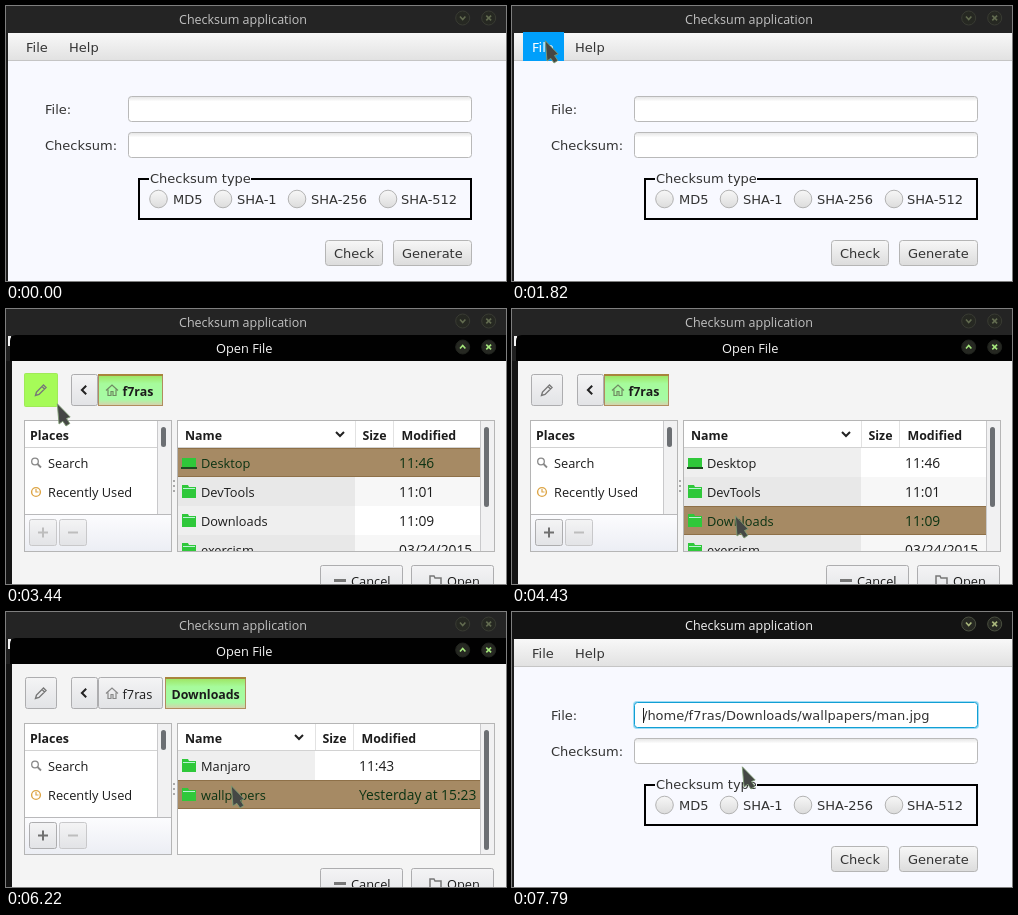
An HTML page that plays this animation: 500 by 275 pixels, repeating every 8 s.

```html
<!DOCTYPE html>
<html lang="en">
<head>
<meta charset="utf-8">
<title>Checksum application</title>
<style>
html, body { margin: 0; width: 100%; height: 100%; overflow: hidden; background: #222; }
svg { display: block; width: 500px; height: 275px; }
text { white-space: pre; }
.fx { font: 13px "DejaVu Sans", sans-serif; fill: #333; }
.ui { font: 12.8px "Open Sans", "Noto Sans", sans-serif; fill: #1c1c1c; }
.num { font-size: 13.8px; }
.bold { font-weight: 700; font-size: 12.4px; }
.title { font-size: 12.5px; }
</style>
</head>
<body>
<svg viewBox="0 0 500 275" xmlns="http://www.w3.org/2000/svg">
  <defs>
    <linearGradient id="bar" x2="0" y2="1"><stop stop-color="#f8f8f8"/><stop offset="1" stop-color="#e1e1e1"/></linearGradient>
    <linearGradient id="btn" x2="0" y2="1"><stop stop-color="#f7f7f7"/><stop offset="1" stop-color="#dcdcdc"/></linearGradient>
    <linearGradient id="gtk" x2="0" y2="1"><stop stop-color="#f4f4f5"/><stop offset="1" stop-color="#e2e3e6"/></linearGradient>
    <linearGradient id="tools" x2="0" y2="1"><stop stop-color="#fcfcfe"/><stop offset="1" stop-color="#eceef4"/></linearGradient>
    <linearGradient id="active" x2="0" y2="1"><stop stop-color="#9de35c"/><stop offset=".3" stop-color="#a6fb9c"/><stop offset=".8" stop-color="#a6fba4"/><stop offset="1" stop-color="#d9cfae"/></linearGradient>
    <linearGradient id="inset" x2="0" y2="1"><stop stop-color="#e4e4e4"/><stop offset=".2" stop-color="#fff"/></linearGradient>
    <filter id="shadow" x="-10%" y="-15%" width="120%" height="130%"><feDropShadow dx="0" dy="1" stdDeviation="2" flood-opacity=".4"/></filter>
    <clipPath id="rows"><rect x="172" y="139" width="302" height="103"/></clipPath>
  </defs>
  <g id="stage"></g>
</svg>
<script>
const LOOP = 8000;
const USER = "f7ras";
const SELECTED = "#a68a64";
const GREEN = "#2fc83a";
const stage = document.getElementById("stage");

const rect = (x, y, w, h, fill, extra = "") =>
  `<rect x="${x}" y="${y}" width="${w}" height="${h}" fill="${fill}" ${extra}/>`;
const box = (x, y, w, h, fill, stroke, r = 2) =>
  rect(x + .5, y + .5, w - 1, h - 1, fill, `stroke="${stroke}" rx="${r}"`);
const line = (d, stroke, width = 1) =>
  `<path d="${d}" fill="none" stroke="${stroke}" stroke-width="${width}"/>`;
const text = (cls, x, y, str, fill) =>
  `<text class="${cls}" x="${x}" y="${y}"${fill ? ` style="fill:${fill}"` : ""}>${str}</text>`;

// Each move: start, end, number of redraws, then the points passed on the way.
const moves = [
  [1000, 1200, 6, [22, 290], [24, 150], [35, -24]],
  [1350, 1590, 7, [35, -24], [32, 33]],
  [1740, 1820, 3, [32, 33], [34, 36]],
  [2520, 2680, 5, [34, 36], [44, 70]],
  [3320, 3440, 4, [44, 70], [52, 96]],
  [3480, 3960, 13, [52, 96], [120, 142], [186, 182], [213, 198], [223, 204]],
  [4240, 4280, 2, [223, 204], [224, 208]],
  [4710, 5500, 18, [224, 208], [226, 192], [230, 177], [232, 168]],
  [5540, 6220, 14, [232, 168], [232, 150], [229, 160], [226, 175]],
  [6710, 7030, 9, [227, 175], [229, 164], [231, 156]]
];

function pointer(t) {
  let at = null;
  for (const [start, end, steps, ...points] of moves) {
    if (t < start) break;
    const step = Math.min(steps, 1 + Math.floor((t - start) / (end - start) * (steps - 1) + 1e-6));
    const pos = step / steps * (points.length - 1);
    const i = Math.min(Math.floor(pos), points.length - 2);
    at = points[i].map((v, k) => Math.round(v + (points[i + 1][k] - v) * (pos - i)));
  }
  return at;
}

const drawPointer = ([x, y]) =>
  `<path transform="translate(${x} ${y})" d="M-.7-1.2L12.2 12L8.5 13.5L11.8 18.5L8 21L4.8 16.3L1 19Z" fill="#454745" stroke="#7f9c74" stroke-width=".9" stroke-linejoin="round"/>`;

function windowButtons(y, color, up, edge) {
  const chevron = up ? `M454 ${y + 1.5}l2.7-3l2.7 3` : `M454 ${y - 1.5}l2.7 3l2.7-3`;
  const disc = x => `<circle cx="${x}" cy="${y}" r="7" fill="#262822" stroke="${edge}"/>`;
  return disc(456.7) + disc(482.7) + line(chevron, color, 1.6) +
    line(`M480.3 ${y - 2.4}l4.8 4.8m0-4.8l-4.8 4.8`, color, 1.6);
}

function titleBar(focused) {
  return rect(0, 0, 500, 275, "#1f1f1f") + rect(0, 0, 500, 27, focused ? "#131313" : "#242424") +
    text("ui title", 173, 18, "Checksum application", focused ? "#f4f4f4" : "#c2c2c2") +
    windowButtons(12, focused ? "#a9b77c" : "#626b50", false, focused ? "#4a4f40" : "#393b33");
}

function field(y, focused) {
  return focused
    ? rect(121, y - 1, 346, 28, "#9edcf5", 'rx="4"') + box(122, y, 344, 26, "#fff", "#129fd4", 3)
    : box(122, y, 344, 26, "url(#inset)", "#b9b9b9", 3);
}

const fxButton = (x, w, label) =>
  box(x, 234, w, 26, "url(#btn)", "#b5b5b5", 3) + text("fx", x + 9, 252, label);

const radio = (cx, x, label) =>
  `<circle cx="${cx}" cy="193" r="8.8" fill="url(#btn)" stroke="#b3b3b3"/>` + text("fx", x, 198, label);

function menuPopup(hover) {
  return `<g filter="url(#shadow)">${box(13, 55, 132, 69, "#f6f6f6", "#c4c4c4", 0)}</g>` +
    (hover ? rect(14, 59, 130, 26, "#009ffb") : "") +
    text("fx", 23, 77, "Open", hover ? "#fff" : "") + text("fx", 90, 77, "Ctrl+O", hover ? "#fff" : "") +
    line("M20 89.5H138", "#cfcfcf") +
    text("fx", 23, 111, "Exit") + text("fx", 90, 111, "Ctrl+X");
}

function mainWindow({ focused, fileHot, popup, itemHot, path }) {
  return titleBar(focused) + rect(2, 27, 498, 248, "#f8f9ff") +
    rect(2, 27, 498, 28, "url(#bar)") + line("M2 54.5H500", "#c5c5c5") +
    (fileHot ? rect(11, 26, 41, 29, "#009ffb") : "") +
    text("fx", 20, 46, "File", fileHot ? "#fff" : "") + text("fx", 63, 46, "Help") +
    text("fx", 39, 108, "File:") + text("fx", 39, 144, "Checksum:") +
    field(90, path) + field(126) +
    (path ? text("fx", 131, 108, path) + line("M131.5 96V111", "#222") : "") +
    rect(133, 173, 332, 40, "none", 'stroke="#000" stroke-width="2"') +
    rect(143, 168, 102, 12, "#f8f9ff") + text("fx", 144, 177, "Checksum type") +
    radio(152.5, 167, "MD5") + radio(217, 231, "SHA-1") +
    radio(291, 305, "SHA-256") + radio(382, 395, "SHA-512") +
    fxButton(319, 58, "Check") + fxButton(387, 79, "Generate") +
    (popup ? menuPopup(itemHot) : "");
}

const HOME = [
  ["Desktop", "", "11:46", "desktop"],
  ["DevTools", "", "11:01", "folder"],
  ["Downloads", "", "11:09", "folder"],
  ["exercism", "", "03/24/2015", "folder"]
];
const DOWNLOADS = [["Manjaro", "", "11:43", "folder"], ["wallpapers", "", "Yesterday at 15:23", "folder"]];
const WALLPAPERS = [["man.jpg", "216.3 kB", "03/16/2015", "image"]];

const places = [
  { files: HOME, sizeX: 350, dateX: 388, arrowX: 334, thumb: 80 },
  { files: DOWNLOADS, sizeX: 310, dateX: 348, arrowX: 293, thumb: 120 },
  { files: WALLPAPERS, sizeX: 325, dateX: 390, arrowX: 308, thumb: 120 }
];

const icons = {
  desktop: y => rect(176, y - 5, 14, 9, GREEN) + rect(175, y + 4, 16, 2, "#1f4a22"),
  folder: y => `<path d="M176 ${y - 7}h6l1 2h7v11h-14z" fill="${GREEN}"/>` + line(`M177 ${y - 3.5}h12`, "#b9f3d5"),
  image: y => rect(175, y - 5, 16, 9, "#202020") + rect(180, y - 1, 6, 1, "#ccc")
};

function fileRow([name, size, date, icon], i, { sizeX, dateX }, selected) {
  const y = 139 + i * 29;
  const odd = i % 2;
  const ink = selected ? "#0b3313" : "";
  const fills = selected ? [SELECTED, SELECTED] : [odd ? "#e8e8e8" : "#efefef", odd ? "#f7f7f7" : "#fff"];
  return rect(172, y, 302, 29, fills[1]) + rect(172, y, sizeX - 173, 29, fills[0]) +
    (selected ? line(`M172 ${y + .5}H474m0 28H172`, "#8e7048") : "") +
    icons[icon](y + 15) + text("ui", 195, y + 20, name, ink) +
    text("ui num", sizeX + 4.5, y + 20, size, ink) + text("ui num", dateX + 5, y + 20, date, ink);
}

// Scrollbar gutter with its thumb
const scrollbar = (x, w, h, thumb) =>
  rect(x, 112, w, h, "#f1f1f2") + line(`M${x + .5} 112v${h}`, "#c9c9cb") +
  rect(x + 4, 118, 5, thumb, "#6c6f73", 'rx="2.5"');

function fileList(place, selected) {
  const { files, sizeX, dateX, arrowX, thumb } = place;
  return box(171, 111, 318, 132, "#fff", "#b5b5b5", 0) +
    `<g clip-path="url(#rows)">${files.map((f, i) => fileRow(f, i, place, i === selected)).join("")}</g>` +
    line("M172 138.5H474", "#d2d2d2") +
    line(`M${sizeX - .5} 112V138M${dateX - .5} 112V138`, "#e2e2e2") +
    text("ui bold", 179, 131, "Name") + text("ui bold", sizeX + 6.5, 131, "Size") +
    text("ui bold", dateX + 7.5, 131, "Modified") +
    line(`M${arrowX - 4} 123l4 4l4-4`, "#222", 2) +
    scrollbar(474, 14, 130, thumb);
}

function pathButton(x, w, label, active, home) {
  const tx = x + (home ? 24.5 : 6.5);
  return box(x, 65, w, 32, active ? "url(#active)" : "url(#gtk)", active ? "#b08c5e" : "#adadaf", active ? 0 : 2) +
    (active ? rect(x, 65, w, 2, "#a8843c") : "") +
    (home ? line(`M${x + 8} 81.5l6-5.5l6 5.5m-10-1v6h3v-4h2v4h3v-6`, active ? "#6f8a62" : "#888", 1.2) : "") +
    text(active ? "ui bold" : "ui", tx, 87, label);
}

function placesPanel(canAdd) {
  return box(18, 111, 148, 132, "#fff", "#b5b5b5", 0) +
    text("ui bold", 24, 131, "Places") + line("M19 138.5H152", "#d2d2d2") +
    `<circle cx="29" cy="152.5" r="3.3" fill="none" stroke="#888" stroke-width="1.3"/>` +
    line("M31.5 155l3.5 3.5", "#888", 1.8) + text("ui", 42, 159, "Search") +
    `<circle cx="30" cy="183" r="4.4" fill="none" stroke="#dda546" stroke-width="1.4"/>` +
    line("M30 180v3h2.5", "#dda546", 1.2) + text("ui", 42, 188, "Recently Used") +
    scrollbar(151, 14, 93, 20) +
    rect(19, 206, 146, 36, "url(#tools)") + line("M19 205.5H165", "#b9b9bb") +
    box(23, 210, 28, 27, "url(#gtk)", canAdd ? "#adadaf" : "#c8c8ca") +
    box(53, 210, 28, 27, "url(#gtk)", "#c8c8ca") +
    line("M32 223.5h10m-5-5v10", canAdd ? "#707070" : "#bdbdbd", 2) + line("M62 223.5h10", "#bdbdbd", 2);
}

function dialog({ depth, selected, editHot, canAdd, openHot }) {
  const edit = editHot ? box(18, 64, 34, 34, "#a6fb58", "#a0ea58", 1) : box(19, 65, 32, 32, "url(#gtk)", "#adadaf");
  return titleBar(false) + rect(2, 27, 3, 10, "#f4f4f4") +
    `<path d="M4 52V32Q4 26 10 26H500V52Z" fill="#010101"/>` +
    rect(0, 52, 6, 223, "#141414") + rect(6, 52, 494, 223, "#f4f4f4") +
    text("ui", 210, 44, "Open File", "#f4f4f4") + windowButtons(38, "#a5e67c", true, "#20231e") +
    edit + line("M29.5 86.5l1-3.5l7-7l2.5 2.5l-7 7zM36 77.5l2.5 2.5", "#777", 1.4) +
    box(65, 65, 27, 32, "url(#gtk)", "#adadaf") + line("M80.2 76.7l-4.3 4.3l4.3 4.3", "#222", 2) +
    pathButton(92, 65, USER, depth === 0, true) +
    (depth > 0 ? pathButton(159, 81, "Downloads", depth === 1) : "") +
    (depth > 1 ? pathButton(242, 79, "wallpapers", true) : "") +
    placesPanel(canAdd) +
    [171, 176, 181].map(y => rect(167, y, 2, 2, "#aaa")).join("") +
    fileList(places[depth], selected) +
    box(314, 256, 83, 32, "url(#gtk)", "#adadaf") + rect(328, 270, 12, 3, "#777") +
    text("ui", 345, 277, "Cancel") +
    box(405, 256, 83, 32, openHot ? "#d2d2d2" : "url(#gtk)", openHot ? "#8c8c8c" : "#adadaf") +
    line("M424 278v-11h4l1 2h6v9", "#777", 1.5) + text("ui", 441, 277, "Open");
}

function selection(t) {
  if (t < 4430) return 0;
  if (t < 4510) return 2;
  if (t < 4550) return -1;
  if (t < 6220) return 0;
  if (t < 6370) return 1;
  return t < 6410 ? -1 : 0;
}

function scene(t) {
  const at = pointer(t);
  const inDialog = t >= 3090 && t < 7750;
  const picture = inDialog
    ? dialog({
        depth: t < 4510 ? 0 : t < 6370 ? 1 : 2,
        selected: selection(t),
        editHot: t >= 3320 && t < 3480,
        canAdd: t >= 4430 && t < 6370,
        openHot: t >= 7500
      })
    : mainWindow({
        focused: (t >= 2110 && t < 3050) || t >= 7790,
        fileHot: at && at[1] > 10 && at[1] < 55 && t >= 1350 || t >= 2110 && t < 3050,
        popup: t >= 2150 && t < 3050,
        itemHot: at && at[1] > 58,
        path: t >= 7790 ? `/home/${USER}/Downloads/wallpapers/man.jpg` : ""
      });
  return picture + (at ? drawPointer(at) : "");
}

let shown = "";
const begin = performance.now();
function draw() {
  const next = scene((performance.now() - begin) % LOOP);
  if (next !== shown) stage.innerHTML = shown = next;
  requestAnimationFrame(draw);
}
draw();
</script>
</body>
</html>
```
